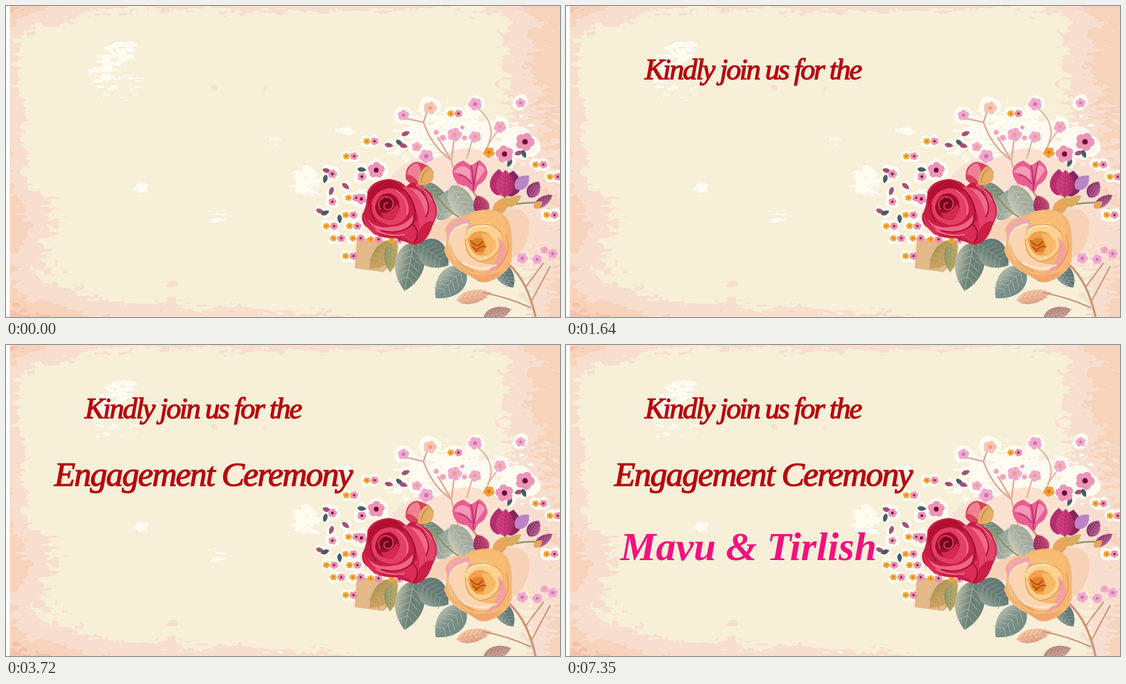
An HTML page with a canvas that plays this animation: 998x561 px, repeating every 8 s.

```html
<!DOCTYPE html>
<html lang="en">
<head>
<meta charset="utf-8">
<title>Invitation</title>
<style>
  html, body { margin: 0; width: 100%; height: 100%; overflow: hidden; background: #fff; }
  canvas, svg { position: absolute; left: 0; top: 0; width: 998px; height: 561px; }
  text { font-family: "Liberation Serif", serif; font-style: italic; opacity: 0; }
  .red { fill: #b8080f; stroke: #b8080f; stroke-width: 1.5px; }
  .names { fill: #f5107f; font-weight: bold; }
</style>
</head>
<body>
<canvas width="998" height="561"></canvas>
<svg viewBox="0 0 998 561">
  <text class="red" x="142" y="132" font-size="53" letter-spacing="-2.8">Kindly join us for the</text>
  <text class="red" x="87" y="254" font-size="62" letter-spacing="-2.2">Engagement Ceremony</text>
  <text class="names" x="98" y="388" font-size="72">Mavu &amp; Tirlish</text>
</svg>
<script>
const W = 998, H = 561, LOOP = 8000, TAU = Math.PI * 2;
const c = document.querySelector('canvas').getContext('2d');

// ---- Aged paper ----
function hash(x, y) {
  let h = Math.imul(x, 374761393) + Math.imul(y, 668265263);
  h = Math.imul(h ^ (h >>> 13), 1274126177);
  return ((h ^ (h >>> 16)) >>> 0) / 4294967296;
}
function noise(x, y) {
  const i = Math.floor(x), j = Math.floor(y);
  let u = x - i, v = y - j;
  u *= u * (3 - 2 * u);
  v *= v * (3 - 2 * v);
  const top = hash(i, j) * (1 - u) + hash(i + 1, j) * u;
  const low = hash(i, j + 1) * (1 - u) + hash(i + 1, j + 1) * u;
  return top * (1 - v) + low * v - 0.5;
}
// Stains: centre x, y, radius x, y, strength
const stains = [
  [15, 0, 110, 42, .85], [450, -12, 620, 30, .75], [0, 250, 38, 300, .8],
  [15, 400, 95, 85, .7], [5, 566, 170, 66, 1.15], [350, 576, 320, 42, .85],
  [1005, 90, 112, 210, 1.25], [1000, 400, 90, 160, .75], [1000, 560, 55, 90, .8],
  [298, 501, 14, 8, .55], [375, 147, 9, 8, .5], [465, 150, 11, 8, .5]
];
const worn = [
  [185, 125, 62, 62], [200, 85, 42, 30], [540, 310, 34, 48], [388, 380, 30, 26],
  [243, 332, 18, 14], [483, 243, 15, 11], [608, 228, 30, 14], [810, 240, 150, 80]
];
const square = n => n * n;

function paintPaper() {
  const image = c.createImageData(W, H);
  for (let y = 0; y < H; y++) for (let x = 0; x < W; x++) {
    const grain = noise(x / 15, y / 5) * .5 + noise(x / 5, y / 3) * .25 + noise(x / 50, y / 25) * .35;
    let stain = grain * .7, white = 0;
    for (const [a, b, rx, ry, s] of stains)
      stain += s * Math.exp(-square((x - a) / rx) - square((y - b) / ry));
    for (const [a, b, rx, ry] of worn)
      white = Math.max(white, 1 - square((x - a) / rx) - square((y - b) / ry));
    let color = [247, 239, 216];
    if (white > 0 && white + grain * 2.3 > .62) color = [255, 251, 241];
    else if (stain > 1.5) color = [245, 194, 171];
    else if (stain > 1) color = [247, 211, 187];
    else if (stain > .46) color = [248, 222, 207];
    if (x < 7) color = [255, 255, 255];
    image.data.set([...color, 255], (y * W + x) * 4);
  }
  c.putImageData(image, 0, 0);
}

// ---- Drawing helpers ----
function fill(color, path) {
  c.fillStyle = color;
  c.fill(new Path2D(path));
}
function line(color, width, path) {
  c.strokeStyle = color;
  c.lineWidth = width;
  c.stroke(new Path2D(path));
}
function dot(x, y, r, color) {
  c.fillStyle = color;
  c.beginPath();
  c.arc(x, y, r, 0, TAU);
  c.fill();
}
function leaf(x0, y0, x1, y1, width, color, vein) {
  const dx = x1 - x0, dy = y1 - y0, len = Math.hypot(dx, dy);
  const at = (t, side) => [x0 + dx * t - dy / len * width * side, y0 + dy * t + dx / len * width * side];
  const shade = c.createLinearGradient(...at(.5, -.5), ...at(.5, .5));
  shade.addColorStop(0, color);
  shade.addColorStop(.5, color);
  shade.addColorStop(1, vein || color);
  c.fillStyle = shade;
  c.beginPath();
  c.moveTo(x0, y0);
  c.bezierCurveTo(...at(.15, .65), ...at(.65, .7), x1, y1);
  c.bezierCurveTo(...at(.65, -.7), ...at(.15, -.65), x0, y0);
  c.fill();
  if (!vein) return;
  c.strokeStyle = vein;
  c.lineWidth = 1;
  c.beginPath();
  c.moveTo(x0, y0);
  c.lineTo(x1, y1);
  for (let t = .15; t < .8; t += .14) for (const side of [-.34, .34]) {
    c.moveTo(...at(t, 0));
    c.lineTo(...at(t + .14, side));
  }
  c.stroke();
}
function blossom(x, y, r, petal, heart) {
  for (let i = 0; i < 5; i++) {
    const a = i * TAU / 5 + x;
    dot(x + Math.cos(a) * r * .55, y + Math.sin(a) * r * .5, r * .48, petal);
  }
  dot(x, y, r * .3, heart);
}

// ---- Bouquet ----
const pale = [
  [716, 197, 10], [764, 184, 12], [845, 177, 12], [927, 175, 9], [890, 218, 11],
  [808, 232, 13], [845, 236, 11], [740, 254, 9], [757, 271, 13], [826, 238, 5],
  [787, 238, 6], [775, 228, 5], [822, 219, 4], [930, 455, 10], [957, 457, 9],
  [985, 447, 9], [970, 440, 7]
];
const dark = [
  [935, 245, 17], [898, 267, 16], [667, 296, 15], [640, 348, 10], [641, 308, 8], [588, 303, 8], [588, 353, 7]
];
const pairs = [
  [657, 244], [620, 271], [808, 194], [624, 346], [619, 377], [584, 397], [626, 397],
  [597, 419], [632, 419], [619, 451], [664, 421], [702, 422], [961, 286], [987, 308], [981, 377]
];
const sprigs = [
  [720, 230, -.4], [690, 251, .2], [709, 247, .7], [716, 252, .3], [924, 265, -.3], [933, 267, 1.2],
  [641, 295, .1], [907, 283, 2], [578, 297, .3], [612, 325, .7], [586, 334, 1.9], [566, 370, .4],
  [575, 373, -.4], [601, 384, 1.5], [575, 312, 1.8]
];

function paintHalos() {
  const halo = (x, y, r) => {
    for (let i = 0; i < 7; i++)
      dot(x + (hash(i, x) - .5) * r, y + (hash(x, i) - .5) * r, r * .9, '#fffbf1');
  };
  pale.slice(0, 13).concat(dark).forEach(([x, y, r]) => halo(x, y, r + 3));
  pairs.forEach(([x, y]) => { halo(x - 6, y, 9); halo(x + 6, y, 9); });
  sprigs.forEach(([x, y]) => halo(x, y, 8));
  fill('#fbe2d0', 'M690 315Q720 265 775 275Q830 240 875 270Q925 290 920 335L945 390 935 470 890 480 790 430 745 420Z');
  fill('#f7d2b7', 'M770 395Q800 375 840 378L795 425 755 420ZM885 370Q935 355 943 390Q945 435 910 458Z');
}

function paintSmallFlowers() {
  const twig = '#dfa38f';
  line(twig, 2.5, 'M718 202L752 210Q768 255 802 278L816 330M752 210L758 192M800 275L778 237M803 276L807 240');
  line(twig, 2, 'M849 184Q875 204 874 232L864 268M888 222L868 250M840 242L830 275');
  for (const [x, y, r] of pale) blossom(x, y, r, y < 190 && x < 780 ? '#f6c3b8' : '#efa9cf', y % 2 ? '#d96faa' : '#efa06a');
  for (const [x, y, a] of sprigs) {
    const dx = Math.cos(a) * 8, dy = Math.sin(a) * 8;
    leaf(x - dx, y - dy, x + dx, y + dy, 8, x % 2 ? '#475d69' : '#a64f78');
  }
  for (const [x, y, r] of dark) blossom(x, y, r, '#ee94b7', '#6e1238');
  for (const [x, y] of pairs) {
    blossom(x - 7, y, 6, '#f6a93a', '#d97822');
    blossom(x + 7, y, 7, '#ee8fac', '#8b1f3c');
  }
  blossom(870, 264, 10, '#f2a036', '#d8741f');
}

function paintFoliage() {
  fill('#e4b888', 'M632 418L700 425 698 462 680 480 628 473Z');
  leaf(704, 424, 655, 474, 36, '#cda264', '#a69856');
  leaf(694, 428, 692, 480, 24, '#b6a567', '#8c9461');
  leaf(745, 318, 802, 362, 28, '#788c78', '#aab19c');
  leaf(778, 386, 812, 326, 38, '#9aa69a', '#c3c5b4');
  leaf(802, 324, 842, 390, 40, '#a3ad9f', '#c9c8b7');
  leaf(735, 425, 718, 514, 52, '#6d8278', '#b8bfaa');
  leaf(744, 428, 797, 468, 50, '#657a75', '#93a298');
  leaf(826, 472, 774, 527, 48, '#768d87', '#b0b9aa');
  leaf(885, 465, 914, 508, 30, '#60787a', '#95a59b');
  leaf(812, 531, 874, 517, 24, '#efc0a0', '#d99f83');
  leaf(860, 563, 910, 547, 24, '#b58b80', '#d5aaa0');
  line('#cb9477', 4, 'M908 468Q940 498 954 561');
  line('#cb9477', 2.5, 'M860 517Q902 525 945 544M936 507L968 464M948 530L980 470');
  line('#8c9a60', 3, 'M870 375Q915 350 973 356M770 335Q790 365 815 380M900 340Q895 365 880 375');
}

function paintBuds() {
  fill('#d8415f', 'M720 312Q718 285 740 281Q762 285 770 300Q768 320 748 327L733 325Z');
  fill('#ee8295', 'M722 305Q726 284 742 284Q752 300 742 316Q730 302 722 305Z');
  fill('#e6ad65', 'M742 322Q742 298 758 289Q776 300 768 315Q758 327 742 322Z');
  line('#b79550', 2, 'M748 318Q750 300 760 295');
  fill('#e85f91', 'M804 299Q807 283 824 279L838 288 852 278Q868 287 867 304Q862 318 850 323L843 338 830 325Q807 324 804 299Z');
  fill('#f39ab7', 'M806 300Q820 280 836 296L838 322Q825 300 806 300ZM848 288Q857 284 863 296L846 320Z');
  line('#b52c67', 2, 'M838 288Q842 306 842 332M850 283Q846 305 843 322M815 304Q830 306 838 320');
  line('#c98468', 3, 'M842 336L852 350');
  leaf(886, 342, 888, 294, 30, '#b42e72');
  leaf(908, 344, 914, 297, 34, '#8d245e');
  leaf(898, 345, 900, 296, 32, '#cd3d7c', '#a52967');
  leaf(918, 330, 942, 306, 22, '#b985c7');
  leaf(942, 345, 960, 317, 23, '#8e356e', '#bb679c');
  leaf(952, 363, 984, 341, 17, '#923b70', '#b76797');
  leaf(951, 364, 966, 353, 12, '#efa35b');
  leaf(863, 376, 848, 342, 28, '#a02c5d', '#c8527a');
  leaf(878, 376, 906, 345, 22, '#e6a75c');
  leaf(900, 361, 928, 342, 16, '#d9ad62');
}

function paintRedRose() {
  fill('#c81d45', 'M651 335Q660 314 690 312Q710 314 721 326Q733 312 742 324Q766 331 770 349Q783 370 768 397Q757 430 735 431Q718 425 702 419Q667 420 657 403Q638 395 642 375Q650 363 651 335Z');
  fill('#e5416b', 'M714 326Q740 326 760 341Q781 360 770 389Q755 385 742 408Q748 364 714 326Z');
  fill('#ef6a88', 'M728 328Q750 334 761 350Q765 366 756 376Q748 345 728 328Z');
  fill('#d92c56', 'M645 376Q651 402 680 402Q716 408 742 386Q750 407 733 428Q703 405 665 413Q642 395 645 376Z');
  fill('#ee6585', 'M650 382Q665 404 697 398Q720 396 733 377Q736 397 708 407Q664 414 650 382Z');
  fill('#b3102f', 'M653 338Q666 316 692 314Q713 319 717 337Q696 322 675 334Q657 345 653 365Z');
  fill('#e23f65', 'M658 359Q665 328 696 329Q724 339 727 367Q720 394 692 395Q659 389 658 359Z');
  fill('#a50b2d', 'M665 362Q670 336 693 338Q712 347 708 367Q700 386 682 384Q666 378 665 362Z');
  fill('#d22a50', 'M676 373Q690 378 704 357Q713 370 697 386Q680 390 676 373Z');
  fill('#74071f', 'M672 360Q676 344 690 347Q702 354 694 366Q680 376 672 360Z');
  line('#db4262', 2, 'M674 367Q666 349 682 344Q700 344 697 361Q690 373 681 364Q680 354 688 355');
  line('#960d31', 2, 'M718 332Q746 362 733 393Q711 414 676 405M749 335Q768 357 757 380M733 394Q748 408 735 428M658 359Q655 375 666 389');
  line('#f58ba0', 1.5, 'M703 333Q728 350 722 376M666 404Q690 418 718 412M739 323Q758 333 767 350');
}

function paintPeachRose() {
  fill('#f5b673', 'M791 402Q799 382 825 380Q842 367 870 367Q895 369 906 389Q913 408 911 445Q913 472 891 486Q872 501 853 497Q833 486 817 477Q795 462 789 440Q798 424 791 402Z');
  fill('#f0a7af', 'M794 402Q805 380 828 383Q844 388 849 402Q820 402 812 430Q792 425 794 402Z');
  fill('#fbd5b2', 'M797 423Q804 394 834 393Q820 419 833 449Q858 471 887 465Q867 487 836 472Q796 460 797 423Z');
  fill('#f7bd74', 'M834 381Q860 361 892 377Q906 396 900 413Q878 389 838 397Z');
  fill('#fbd28e', 'M825 419Q835 391 865 391Q891 397 894 424Q882 461 851 460Q827 449 825 419Z');
  fill('#f2a04b', 'M832 421Q839 405 858 406Q880 412 879 435Q865 454 847 449Q833 438 832 421Z');
  fill('#f6b967', 'M855 411Q878 410 883 431Q876 451 857 452Q872 434 855 411Z');
  fill('#e08127', 'M836 428Q845 414 858 420Q867 432 859 444Q842 448 836 428Z');
  fill('#f3a0a0', 'M886 417Q905 431 899 457Q887 478 863 483Q895 458 886 417Z');
  fill('#f4a66c', 'M818 474Q850 495 893 478Q874 504 851 497Z');
  line('#b65219', 2.5, 'M837 423Q849 440 858 425M846 443Q855 431 864 434M840 434L849 441');
  line('#e79450', 1.5, 'M828 420Q826 449 852 461Q881 460 894 428M837 398Q871 386 891 407M800 434Q810 465 843 479M901 412Q913 447 884 474');
  line('#fff0cf', 2, 'M799 419Q803 397 831 393M832 406Q848 391 872 398M823 463Q852 481 883 467');
}

paintPaper();
c.lineCap = c.lineJoin = 'round';
paintHalos();
paintFoliage();
paintSmallFlowers();
paintBuds();
paintRedRose();
paintPeachRose();

// ---- Lines of text fade in one after another ----
const fades = [[800, 820], [2940, 780], [6450, 870]];
const texts = document.querySelectorAll('text');
const start = performance.now();
function frame() {
  const t = (performance.now() - start) % LOOP;
  fades.forEach(([begin, duration], i) => {
    texts[i].style.opacity = Math.min(1, Math.max(0, (t - begin) / duration));
  });
  requestAnimationFrame(frame);
}
frame();
</script>
</body>
</html>
```
